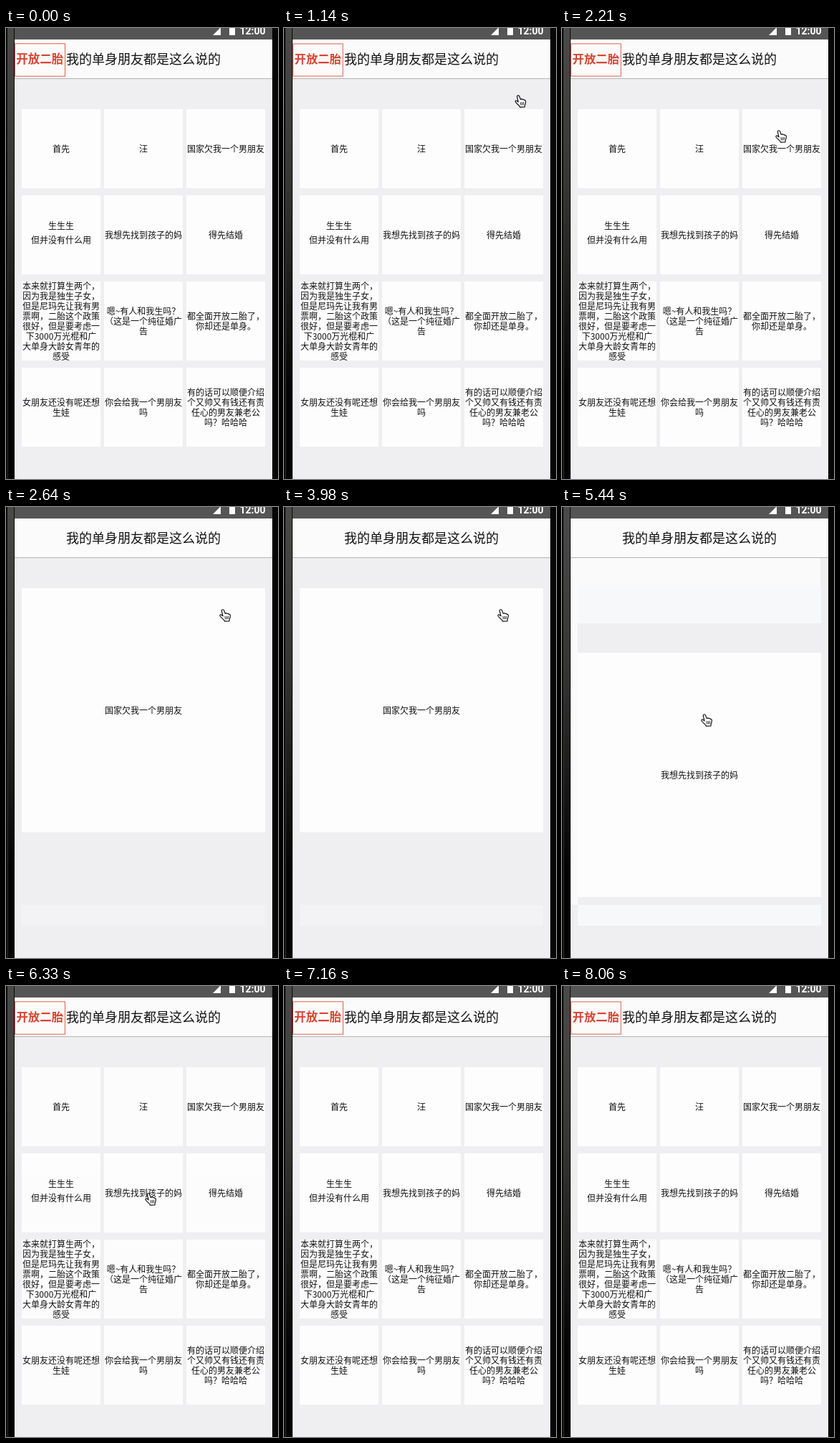
Animation of 380x628 px, one loop 8160 ms. Source, as an HTML page:

```html
<!DOCTYPE html>
<html lang="zh-CN">
<head>
<meta charset="utf-8">
<style>
  html, body { margin: 0; width: 100%; height: 100%; overflow: hidden; background: #efeff1; }
  svg { display: block; width: 380px; height: 628px; }
  text { font-family: "Noto Sans CJK SC", "Noto Sans CJK", sans-serif; fill: #111; }
  .cell text { font-size: 12px; text-anchor: middle; }
  .cell rect { fill: #fdfdfd; }
</style>
</head>
<body>
<svg viewBox="0 0 380 628">
  <defs>
    <linearGradient id="edge" x1="0" y1="0" x2="0" y2="1">
      <stop offset="0" stop-color="#4a4a49"/>
      <stop offset=".35" stop-color="#353534"/>
      <stop offset=".6" stop-color="#191918"/>
      <stop offset=".8" stop-color="#030303"/>
    </linearGradient>
  </defs>
  <rect width="380" height="628" fill="#efeff1"/>
  <g id="glow">
    <path d="M12 71H361V112H22V554H12Z" fill="#fafafb"/>
    <rect x="22" y="112" width="340" height="50" fill="#f7f8fa"/>
  </g>
  <rect id="strip" x="22" y="554" width="340" height="29"/>
  <g id="cells"></g>
  <rect x="12" y="16" width="360" height="54" fill="#fbfbfb"/>
  <rect x="12" y="70" width="360" height="1" fill="#b4b4b4"/>
  <text x="84" y="50" font-size="18">我的单身朋友都是这么说的</text>
  <g id="badge">
    <rect x="12.5" y="21.8" width="70" height="45.4" fill="#fdfbfa" stroke="#d9604f"/>
    <text x="47.3" y="49" font-size="16.5" font-weight="700" text-anchor="middle" style="fill:#d54534">开放二胎</text>
  </g>
  <rect x="12" width="360" height="16" fill="#555"/>
  <path d="M289 10L300 -1V10Z" fill="#fff"/>
  <rect x="312" y="-2" width="8" height="12" fill="#fff"/>
  <text x="326.5" y="9" font-size="14" font-weight="700" style="font-family:Roboto,sans-serif;fill:#fff">12:00</text>
  <rect width="12" height="628" fill="url(#edge)"/>
  <rect width="2" height="628" fill="#0b0b0b"/>
  <rect x="2" width="1" height="628" fill="#4a4846" opacity=".6"/>
  <rect x="11" width="1" height="628" fill="#0a0a0a"/>
  <rect x="372" width="8" height="628" fill="#060606"/>
  <g id="hand" stroke="#111" stroke-width="1.2" stroke-linejoin="round" stroke-linecap="round">
    <path fill="#fff" d="M3.2 2.4C3.6 .4 5.8 .2 6.5 2L8.2 6.4C9 5.5 10.4 5.6 10.9 6.6C11.8 5.9 13 6.3 13.3 7.4C14.6 7 15.3 8 15.3 9.2C15.5 11.6 14.4 13 14 15V16.8L7.4 17.2L6.8 15.6C5 14 3 12.4 1.2 10C.2 8.4 1.6 7.2 3 8.3L5 9.8Z"/>
    <path fill="none" stroke-width=".9" d="M8 10.5L8.5 14M10.2 10.3L10.5 14M12.3 10.2V13.6"/>
  </g>
</svg>
<script>
const LOOP = 8160;
const MESSAGES = [
  "首先", "汪", "国家欠我一个男朋友",
  "生生生|但并没有什么用", "我想先找到孩子的妈", "得先结婚",
  "本来就打算生两个，|因为我是独生子女，|但是尼玛先让我有男|票啊，二胎这个政策|很好，但是要考虑一|下3000万光棍和广|大单身大龄女青年的|感受",
  "嗯~有人和我生吗？|（这是一个纯征婚广|告", "都全面开放二胎了，|你却还是单身。",
  "女朋友还没有呢还想|生娃", "你会给我一个男朋友|吗",
  "有的话可以顺便介绍|个又帅又有钱还有责|任心的男友兼老公|吗？哈哈哈"
];
const VIEWS = [
  { cell: 2, top: 113, open: [2260, 2570], close: [4040, 4320] },
  { cell: 4, top: 203, open: [5040, 5390], close: [6040, 6340] }
];
// time, x, y of the pointer's upper left corner
const PATH = [
  [690, 380, 70], [840, 331, 83], [1640, 308, 110], [2120, 298, 142],
  [4320, 298, 142], [4540, 212, 265], [4760, 194, 288],
  [6380, 194, 288], [6810, 373, 250]
];

const $ = id => document.getElementById(id);
const clamp = v => Math.max(0, Math.min(1, v));
const ramp = (t, [from, to]) => clamp((t - from) / (to - from));
const ease = p => (1 - Math.cos(Math.PI * p)) / 2;
const mix = (a, b, p) => a + (b - a) * p;

const cells = MESSAGES.map((message, i) => {
  const lines = message.split("|");
  const loose = i === 3;
  const gap = loose ? 20 : 14;
  const shift = loose ? -3 : 0;
  const x = 22 + i % 3 * 115, y = 113 + Math.floor(i / 3) * 120;
  const node = document.createElementNS("http://www.w3.org/2000/svg", "g");
  node.setAttribute("class", "cell");
  node.innerHTML = "<rect/><g>" + lines.map((line, k) =>
    `<text y="${(k - (lines.length - 1) / 2) * gap + shift + 5}">${line}</text>`).join("") + "</g>";
  $("cells").append(node);
  const cell = { node, x, y, box: node.firstChild, label: node.lastChild };
  place(cell, x, y, 110);
  return cell;
});

function place({ box, label }, x, y, size) {
  for (const [name, value] of Object.entries({ x, y, width: size, height: size })) box.setAttribute(name, value);
  label.setAttribute("transform", `translate(${x + size / 2} ${y + size / 2})`);
}

function pointer(t) {
  const i = PATH.findIndex(([time]) => time > t);
  if (i < 1) return null;
  const [a, b] = [PATH[i - 1], PATH[i]];
  const p = ramp(t, [a[0], b[0]]);
  return [mix(a[1], b[1], p), mix(a[2], b[2], p)];
}

let raised = -1;
function draw(t) {
  const second = t >= 4700;
  const view = VIEWS[+second];
  const amount = ease(ramp(t, view.open)) * (1 - ease(ramp(t, view.close)));

  if (raised !== view.cell) {
    raised = view.cell;
    $("cells").append(cells[raised].node);
  }
  cells.forEach((cell, i) => {
    const chosen = i === view.cell;
    const p = chosen ? amount : 0;
    place(cell, mix(cell.x, 22, p), mix(cell.y, view.top, p), mix(110, 340, p));
    cell.node.setAttribute("opacity", chosen ? 1 : 1 - amount);
  });

  $("glow").setAttribute("opacity", second ? amount : 0);
  $("strip").setAttribute("opacity", amount);
  $("strip").setAttribute("fill", second ? "#f7f8fa" : "#f3f3f5");

  const scale = 0.996 + 0.004 * Math.cos(t / LOOP * 32 * 2 * Math.PI);
  $("badge").setAttribute("transform", `translate(47.5 44.5) scale(${scale}) translate(-47.5 -44.5)`);
  $("badge").setAttribute("opacity", 1 - amount);

  const spot = pointer(t);
  $("hand").setAttribute("visibility", spot ? "visible" : "hidden");
  if (spot) $("hand").setAttribute("transform", `translate(${spot})`);
}

const start = performance.now();
function tick() {
  draw((performance.now() - start) % LOOP);
  requestAnimationFrame(tick);
}
tick();
</script>
</body>
</html>
```
